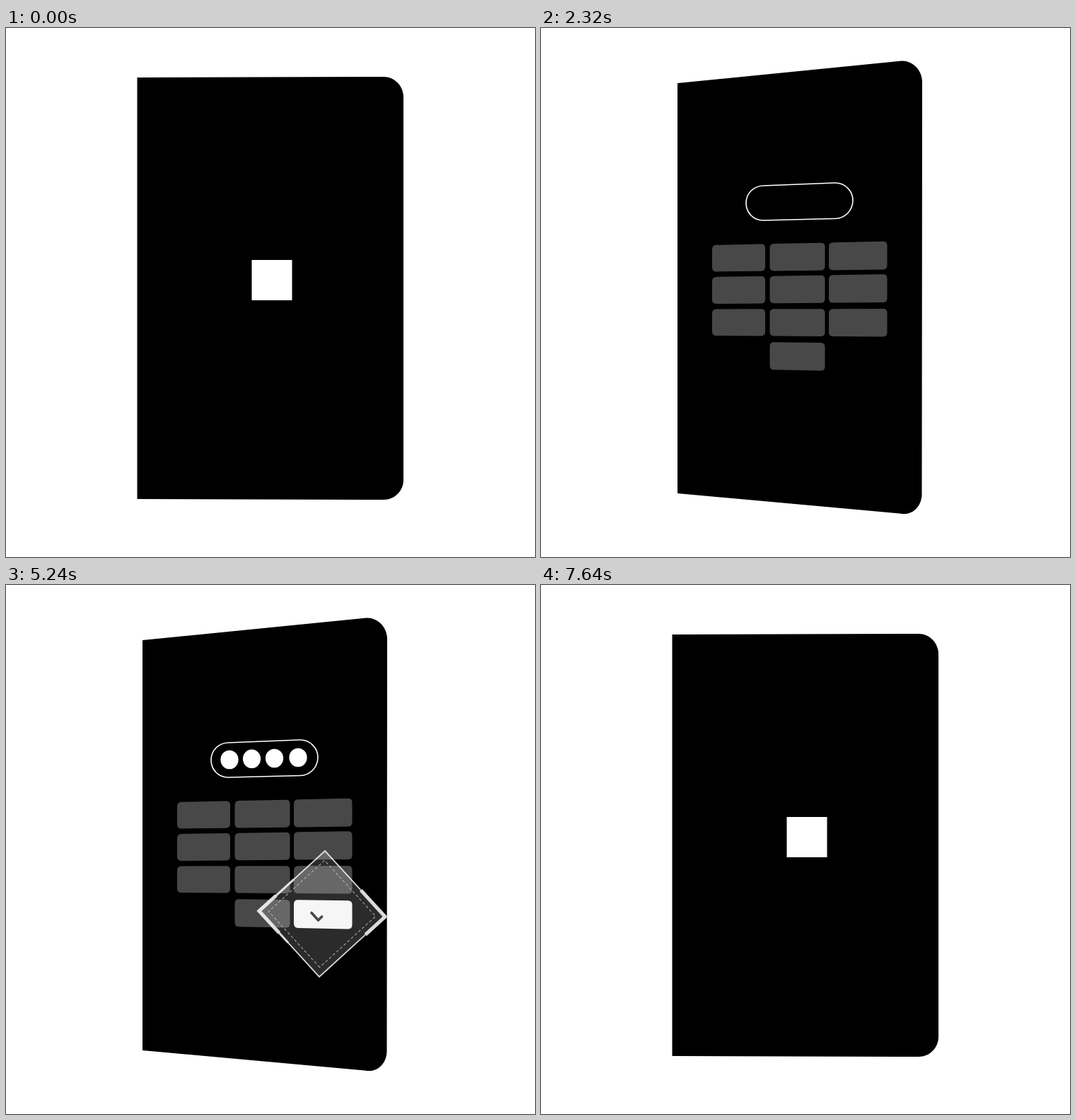
An HTML page for the animation above (8000 ms loop, 748x748 px).

```html
<!DOCTYPE html>
<html lang="en">
<head>
<meta charset="utf-8">
<title>Unlock</title>
<style>
  html, body { margin: 0; width: 100%; height: 100%; overflow: hidden; background: #fff; }
  svg { display: block; width: 100%; height: 100%; }
</style>
</head>
<body>
<svg id="stage" viewBox="0 0 748 748"></svg>
<script>
const LOOP = 8000, ASPECT = 0.89;
const stage = document.getElementById('stage');

function add(tag, attrs, parent = stage) {
  const el = document.createElementNS('http://www.w3.org/2000/svg', tag);
  set(el, attrs);
  parent.appendChild(el);
  return el;
}
function set(el, attrs) {
  for (const name in attrs) el.setAttribute(name, attrs[name]);
}
const lerp = (a, b, t) => a + (b - a) * t;
const ramp = (t, from, to) => Math.min(1, Math.max(0, (t - from) / (to - from)));
const smooth = x => x * x * (3 - 2 * x);
const ease = (t, from, to) => smooth(ramp(t, from, to));
const gray = v => `rgb(${[v, v, v].map(Math.round)})`;
const fmt = p => p.map(n => n.toFixed(2)).join(' ');

// Card outline, facing the viewer and turned.
const FLAT = [[185.5, 70], [534, 69], [549.5, 69], [562, 82], [562, 98], [562, 639],
  [562, 654.5], [549.5, 667], [534, 667], [185.5, 666]];
const TURNED = [[193, 78], [510, 46.5], [526, 46], [539, 60], [539, 76], [538.5, 659],
  [538.5, 675], [527, 688], [512, 687], [193, 658]];

function cardPath(k) {
  const p = FLAT.map((f, i) => fmt([lerp(f[0], TURNED[i][0], k), lerp(f[1], TURNED[i][1], k)]));
  return `M${p[0]} L${p[1]} C${p[2]} ${p[3]} ${p[4]} L${p[5]} C${p[6]} ${p[7]} ${p[8]} L${p[9]} Z`;
}

// Edges of the card plane at turn k.
function plane(k) {
  return {
    left: lerp(185.5, 193, k), right: lerp(562, 539, k), a: lerp(1, ASPECT, k),
    top: [lerp(70, 78, k), lerp(69, 43.6, k)],
    bottom: [lerp(666, 658, k), lerp(667, 689.5, k)]
  };
}
// Moves a point lying on the card at one turn to its place at another.
function move([x, y], from, to) {
  const s = (x - from.left) / (from.right - from.left);
  const y0 = lerp(...from.top, s), v = (y - y0) / (lerp(...from.bottom, s) - y0);
  const u = s / (s + from.a * (1 - s));
  const r = u * to.a / (u * to.a + 1 - u);
  return [lerp(to.left, to.right, r), lerp(lerp(...to.top, r), lerp(...to.bottom, r), v)];
}
const flatPlane = plane(0), turnedPlane = plane(1);

function roundedPath(pts, radius) {
  const toward = (a, b) => {
    const d = Math.hypot(b[0] - a[0], b[1] - a[1]);
    return [lerp(a[0], b[0], radius / d), lerp(a[1], b[1], radius / d)];
  };
  return pts.map((p, i) => {
    const prev = pts[(i + 3) % 4], next = pts[(i + 1) % 4];
    return `${i ? 'L' : 'M'}${fmt(toward(p, prev))} Q${fmt(p)} ${fmt(toward(p, next))}`;
  }).join(' ') + ' Z';
}

const clip = add('path', {}, add('clipPath', { id: 'cardClip' }, add('defs', {})));
const card = add('path', { fill: '#000' });
const mark = add('path', { fill: '#fff' });
const screen = add('g', {});

// Keypad
const COLS = [[242, 317], [323.5, 401.5], [407, 489.5]];
const ROWS = [[307, 301.6, 344.5, 341.5], [352, 348.2, 390, 388],
  [397.5, 397, 435, 436.5], [443, 446.2, 481.5, 486.5]];
const keys = [];
ROWS.forEach((row, r) => COLS.forEach(([x0, x1], c) => {
  if (r === 3 && c === 0) return;
  const at = (x, a, b) => [x, lerp(a, b, (x - 242) / 247)];
  keys.push({
    r, c, el: add('path', {}, screen),
    pts: [at(x0, row[0], row[1]), at(x1, row[0], row[1]), at(x1, row[2], row[3]), at(x0, row[2], row[3])]
  });
}));
const okKey = keys[keys.length - 1];
const presses = [[0, 2], [1, 0], [2, 2], [1, 1]].map(([r, c], i) => ({ r, c, at: 2790 + i * 205 }));

// Code field
const PILL = [[314, 223], [415, 219], [429.5, 218.5], [441, 230], [441, 244], [441, 257.5], [430, 269.2],
  [416, 269.5], [314, 272], [300, 272], [290, 261], [290, 247.5], [290, 234.5], [300, 223.5], [314, 223]];
const pill = add('path', { fill: 'none', stroke: '#fff', 'stroke-width': 1.6, pathLength: 1 }, screen);
const DOTS = [[316, 247], [347.5, 245.8], [379.5, 245], [413, 244]];
const dots = DOTS.map(() => add('ellipse', { fill: '#fff' }, screen));
const TICK = [[432, 463.5], [441.5, 474], [461.5, 454.5]];
const tick = add('path', {
  fill: 'none', stroke: '#222', 'stroke-width': 3.6, 'stroke-linecap': 'round',
  'stroke-linejoin': 'round', pathLength: 1
}, screen);

// Spinning touch target
const overlay = add('g', { 'clip-path': 'url(#cardClip)' });
function makeTarget(x, y, start) {
  const g = add('g', {}, overlay);
  add('rect', { x: -64, y: -64, width: 128, height: 128, fill: '#fff', 'fill-opacity': 0.2 }, g);
  const frame = add('g', {}, g);
  const shade = add('rect', { x: -63, y: -63, width: 126, height: 126, fill: '#000' }, frame);
  const square = 'M63 -63 H-63 V63 H63 Z';
  const line = (w, extra) => add('path', { d: square, fill: 'none', stroke: '#fff', 'stroke-width': w, ...extra }, frame);
  line(1.7);
  const bars = [[1, 0.35, 0.35, 5], [3, 0.31, 0.28, 5], [3, 0.58, 0.43, 3]].map(
    ([corner, before, after, w]) => ({ corner, before, after, el: line(w, { pathLength: 4 }) }));
  const dashed = add('rect', {
    x: -53.5, y: -53.5, width: 107, height: 107, fill: 'none', stroke: '#ccc',
    'stroke-width': 1, 'stroke-dasharray': '4 3'
  }, g);

  return t => {
    const p = t - start;
    const shown = p >= 0 && p < 1000;
    set(g, { display: shown ? 'inline' : 'none' });
    if (!shown) return;
    const enter = ease(p, -40, 240);
    const turn = -180 * Math.pow(ramp(p, 280, 1000), 1.7);
    const press = ease(p, 280, 360) * (1 - ease(p, 480, 720));
    set(g, {
      transform: `translate(${x} ${y}) rotate(${turn}) scale(${lerp(0.6, 1, enter)})`,
      opacity: enter * (1 - ramp(p, 860, 1010))
    });
    set(frame, { transform: `scale(${1 - 0.113 * press})` });
    set(shade, { 'fill-opacity': 0.33 * press });
    set(dashed, { transform: `scale(${1 - 0.16 * press})` });
    const slide = Math.max(0, p - 280) * 0.00175;
    const grow = ease(p, 0, 270);
    for (const b of bars) {
      const len = Math.max(0.001, (b.before + b.after) * grow);
      set(b.el, {
        'stroke-dasharray': `${len} ${4 - len}`,
        'stroke-dashoffset': -(b.corner - b.before * grow + slide)
      });
    }
  };
}
const targets = [makeTarget(566, 161, 880), makeTarget(447, 465, 4360)];

function draw(t) {
  const k = ease(t, 10, 890) * (1 - ease(t, 6860, 7640));
  const now = plane(k);
  const place = p => move(p, turnedPlane, now);
  const outline = cardPath(k);
  set(card, { d: outline });
  set(clip, { d: outline });

  const corners = [[347.5, 328], [404.5, 328], [404.5, 385], [347.5, 385]];
  set(mark, {
    d: 'M' + corners.map(p => fmt(move(p, flatPlane, now))).join(' L') + ' Z',
    opacity: t < 4000 ? 1 - ramp(t, 1400, 1740) : ramp(t, 7240, 7600)
  });

  set(screen, { opacity: 1 - ramp(t, 6868, 7240) });
  for (const key of keys) {
    let light = 72, alpha = ramp(t, 1360 + key.r * 40, 1540 + key.r * 40);
    for (const q of presses) {
      if (q.r === key.r && q.c === key.c && t >= q.at) light += 78 * (1 - ease(t, q.at, q.at + 170));
    }
    if (key === okKey) {
      alpha = ramp(t, 4350, 4560);
      light = lerp(72, 245, ease(t, 4960, 5180));
    }
    set(key.el, { d: roundedPath(key.pts.map(place), 6), fill: gray(light), opacity: alpha });
  }

  const q = PILL.map(p => fmt(place(p)));
  const drawn = ease(t, 1700, 2320);
  set(pill, {
    d: `M${q[0]} L${q[1]} C${q[2]} ${q[3]} ${q[4]} C${q[5]} ${q[6]} ${q[7]} ` +
       `L${q[8]} C${q[9]} ${q[10]} ${q[11]} C${q[12]} ${q[13]} ${q[14]}`,
    'stroke-dasharray': drawn < 1 ? `${drawn} 2` : 'none',
    opacity: drawn > 0 ? 1 : 0
  });

  dots.forEach((dot, i) => {
    const [cx, cy] = place(DOTS[i]);
    const s = ease(t, presses[i].at, presses[i].at + 160);
    set(dot, { cx, cy, rx: 12.6 * s, ry: 13.3 * s });
  });

  const ticked = ease(t, 5120, 5360);
  set(tick, {
    d: 'M' + TICK.map(p => fmt(place(p))).join(' L'),
    'stroke-dasharray': ticked < 1 ? `${ticked} 2` : 'none',
    opacity: ticked > 0 ? 1 : 0
  });

  targets.forEach(update => update(t));
}

const begin = performance.now();
function tickFrame() {
  draw((performance.now() - begin) % LOOP);
  requestAnimationFrame(tickFrame);
}
draw(0);
requestAnimationFrame(tickFrame);
</script>
</body>
</html>
```
